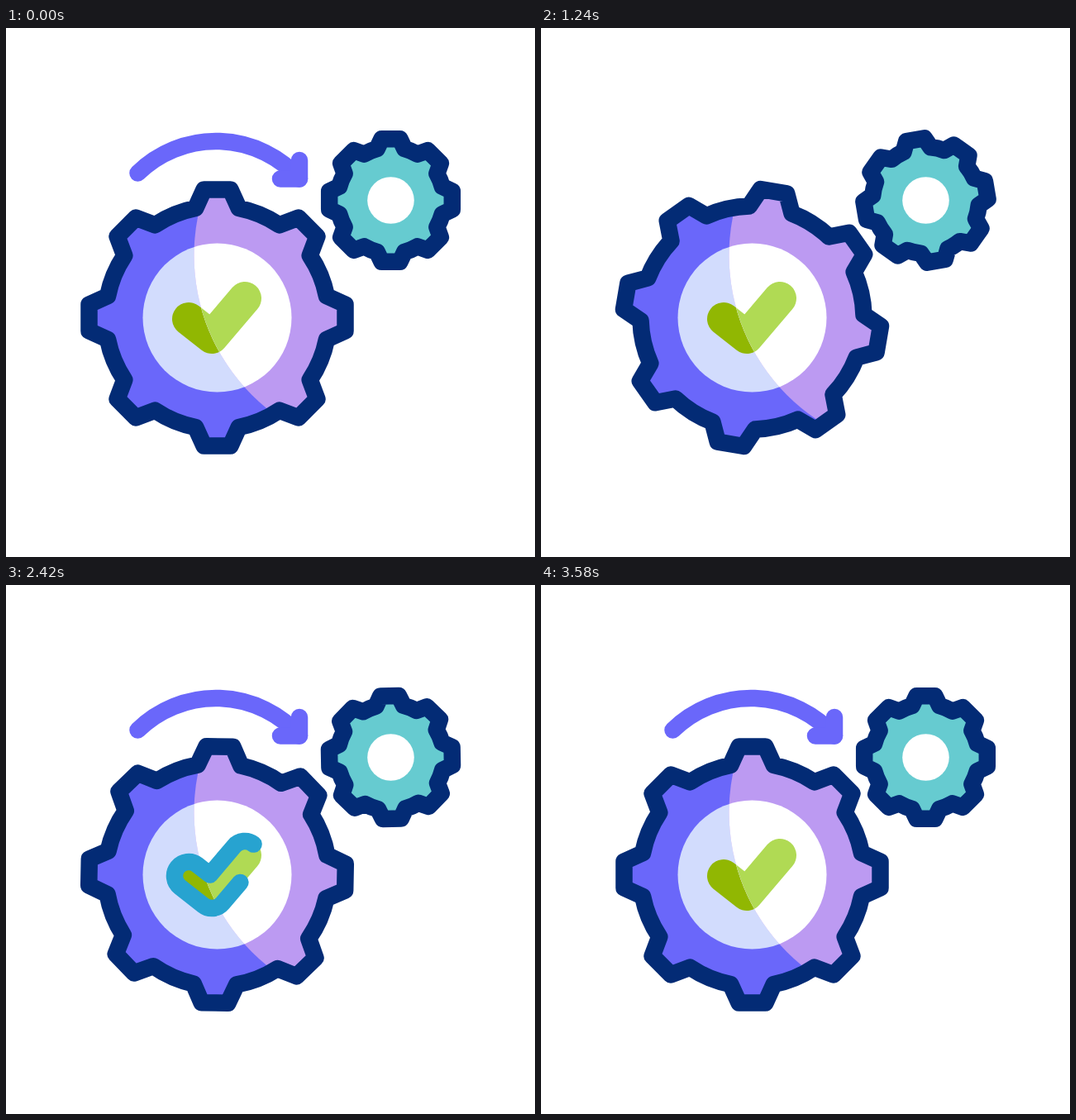
Write an HTML page that moves like this. It is 640 px wide and 640 px high and loops after 3.6 s.

```html
<!DOCTYPE html>
<html lang="en">
<head>
<meta charset="utf-8">
<title>Gears</title>
<style>
  html, body { margin: 0; width: 100%; height: 100%; overflow: hidden; background: #fff; }
  svg { display: block; width: 100vw; height: 100vh; }
  .line { fill: none; stroke-width: 20.5; stroke-linecap: round; stroke-linejoin: round; }
  .navy { stroke: #032b75; }
  .violet { stroke: #6a67fa; }
  .cyan { stroke: #27a3d0; }
</style>
</head>
<body>
<svg viewBox="0 0 640 640">
  <defs>
    <path id="big"/>
    <path id="small"/>
    <circle id="disc" cx="255.5" cy="350.5" r="90"/>
    <path id="check" d="M221 352L249 374L289 327" fill="none" stroke-width="40" stroke-linecap="round" stroke-linejoin="round"/>
    <clipPath id="lit"><circle cx="466.5" cy="275" r="239"/></clipPath>
  </defs>

  <use href="#big" fill="#6a67fa"/>
  <use href="#disc" fill="#d2dcfd"/>
  <use href="#check" stroke="#91b702"/>
  <g clip-path="url(#lit)">
    <use href="#big" fill="#bc9af2"/>
    <use href="#disc" fill="#fff"/>
    <use href="#check" stroke="#b0da54"/>
  </g>
  <use href="#big" class="line navy"/>

  <use href="#small" fill="#66cbd0"/>
  <use href="#small" class="line navy"/>
  <circle cx="465.5" cy="208.5" r="28.3" fill="#fff"/>

  <path id="arc" class="line violet" pathLength="1" d="M159.5 175.5A135 135 0 0 1 355 182.5"/>
  <path id="head" class="line violet"/>
  <path id="outline" class="line cyan" pathLength="1"
    d="M299.5 313.6A17 17 0 0 0 276 316L246.7 350.5L231.5 338.6A17 17 0 0 0 210.5 365.4L238.5 387.4A17 17 0 0 0 262 385L302 338A17 17 0 0 0 299.5 313.6"/>
</svg>
<script>
const LOOP = 3600, STEP = 20, END = LOOP - STEP;
const el = id => document.getElementById(id);
const ramp = (t, from, to) => Math.min(1, Math.max(0, (t - from) / (to - from)));
const ease = x => x * x * (3 - 2 * x);

// Eight trapezoid teeth on a round body, centred on the origin.
function gearPath(body, baseAngle, tip, tipHalf) {
  const polar = (r, deg) => {
    const a = deg * Math.PI / 180;
    return `${(r * Math.sin(a)).toFixed(2)} ${(-r * Math.cos(a)).toFixed(2)}`;
  };
  const tipAngle = Math.atan2(tipHalf, tip) * 180 / Math.PI;
  const tipRadius = Math.hypot(tip, tipHalf);
  let d = '';
  for (let a = 0; a < 360; a += 45) {
    d += a ? `A${body} ${body} 0 0 1 ` : 'M';
    d += polar(body, a - baseAngle) + 'L' + polar(tipRadius, a - tipAngle)
      + 'L' + polar(tipRadius, a + tipAngle) + 'L' + polar(body, a + baseAngle);
  }
  return d + `A${body} ${body} 0 0 1 ${polar(body, -baseAngle)}Z`;
}

function trim(path, start, end) {
  path.style.visibility = end > start ? 'visible' : 'hidden';
  path.style.strokeDasharray = `${end - start} 2`;
  path.style.strokeDashoffset = -start;
}

function spin(gear, x, y, angle) {
  gear.setAttribute('transform', `translate(${x} ${y}) rotate(${angle})`);
}

function draw(t) {
  const angle = 360 * ease(ramp(t, 0, END));
  spin(el('big'), 255.5, 350.5, angle);
  spin(el('small'), 465.5, 208.5, -angle);

  // The arrow runs out forwards, then is drawn again.
  const leaving = t < 960;
  trim(el('arc'), leaving ? ramp(t, 0, 590) : 0, leaving ? 1 : ramp(t, 1302, 1892));
  const head = leaving ? 1 - ramp(t, 590, 690) : ramp(t, 1892, 1992);
  el('head').setAttribute('d', head ? `M355 ${182.5 - 22.5 * head}V182.5H${355 - 23 * head}` : '');

  trim(el('outline'), ramp(t, 2551, END), ramp(t, 1509, 2634));
}

el('big').setAttribute('d', gearPath(135, 11.2, 155, 16));
el('small').setAttribute('d', gearPath(64.5, 15, 74.3, 11));

function tick() {
  draw(Math.floor(performance.now() % LOOP / STEP) * STEP);
  requestAnimationFrame(tick);
}
tick();
</script>
</body>
</html>
```
